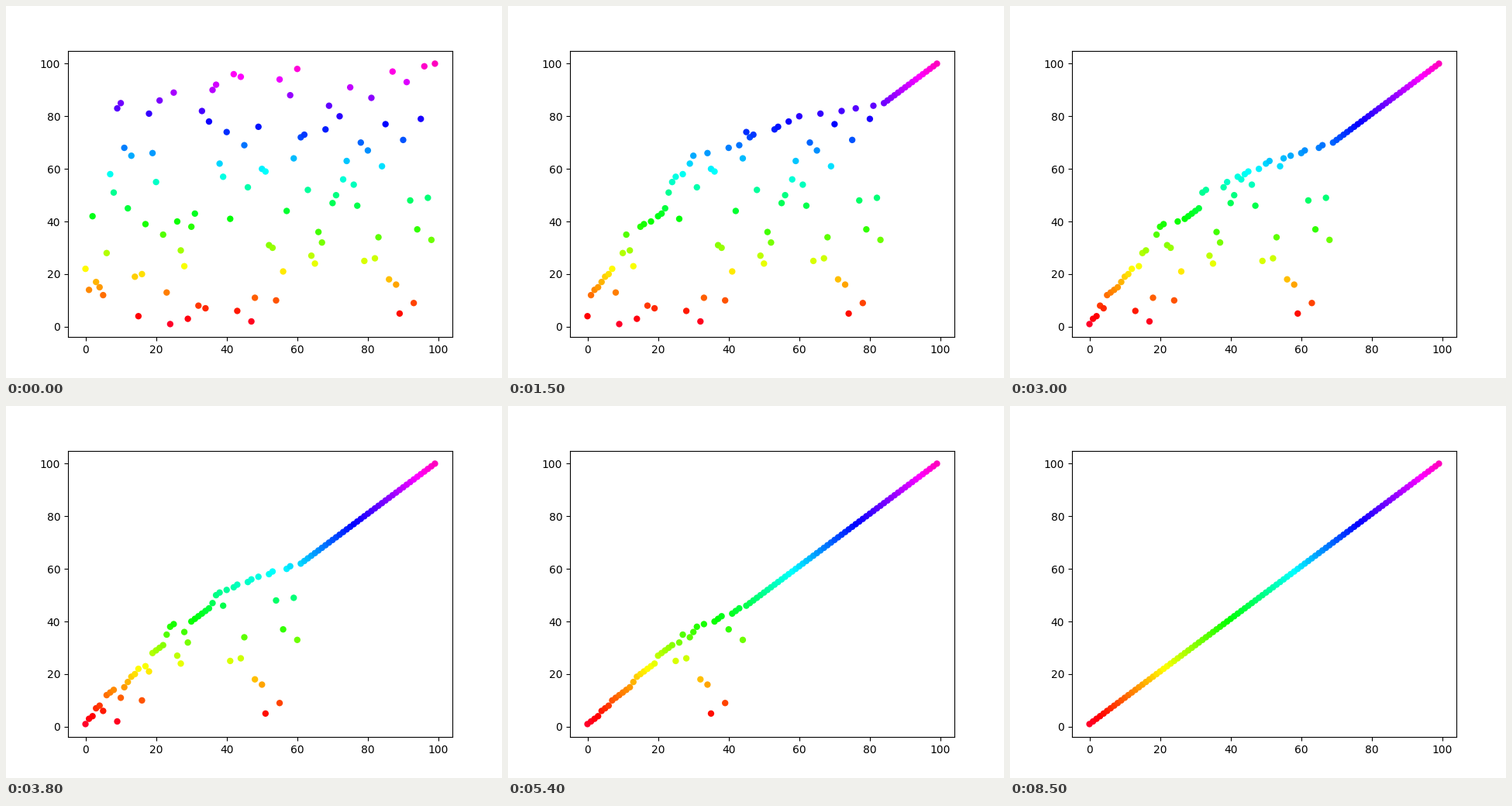
These frames come from a looping animation (640 px wide and 480 px high, 8800 ms). A matplotlib script:

```python
import numpy as np
import matplotlib.pyplot as plt
from matplotlib.animation import FuncAnimation

FRAMES = 88
INTERVAL = 100  # ms

START = [
    22, 14, 42, 17, 15, 12, 28, 58, 51, 83,
    85, 68, 45, 65, 19, 4, 20, 39, 81, 66,
    55, 86, 35, 13, 1, 89, 40, 29, 23, 3,
    38, 43, 8, 82, 7, 78, 90, 92, 62, 57,
    74, 41, 96, 6, 95, 69, 53, 2, 11, 76,
    60, 59, 31, 30, 10, 94, 21, 44, 88, 64,
    98, 72, 73, 52, 27, 24, 36, 32, 75, 84,
    47, 50, 80, 56, 63, 91, 54, 46, 70, 25,
    67, 87, 26, 34, 61, 77, 18, 97, 16, 5,
    71, 93, 48, 9, 37, 79, 99, 49, 33, 100,
]


def bubble_pass(values):
    """Return a copy of values after one left-to-right bubble pass."""
    out = list(values)
    for i in range(len(out) - 1):
        if out[i] > out[i + 1]:
            out[i], out[i + 1] = out[i + 1], out[i]
    return out


states = [START]
while len(states) < FRAMES:
    states.append(bubble_pass(states[-1]))

index = np.arange(len(START))
fig, ax = plt.subplots(figsize=(6.4, 4.8), dpi=100)
dots = ax.scatter(index, START, c=START, s=36, linewidths=0,
                  cmap="gist_rainbow")


def update(n):
    values = np.array(states[n])
    dots.set_offsets(np.column_stack([index, values]))
    dots.set_array(values)
    return (dots,)


anim = FuncAnimation(fig, update, frames=FRAMES, interval=INTERVAL,
                     init_func=lambda: update(0), repeat=True)
plt.show()
```
